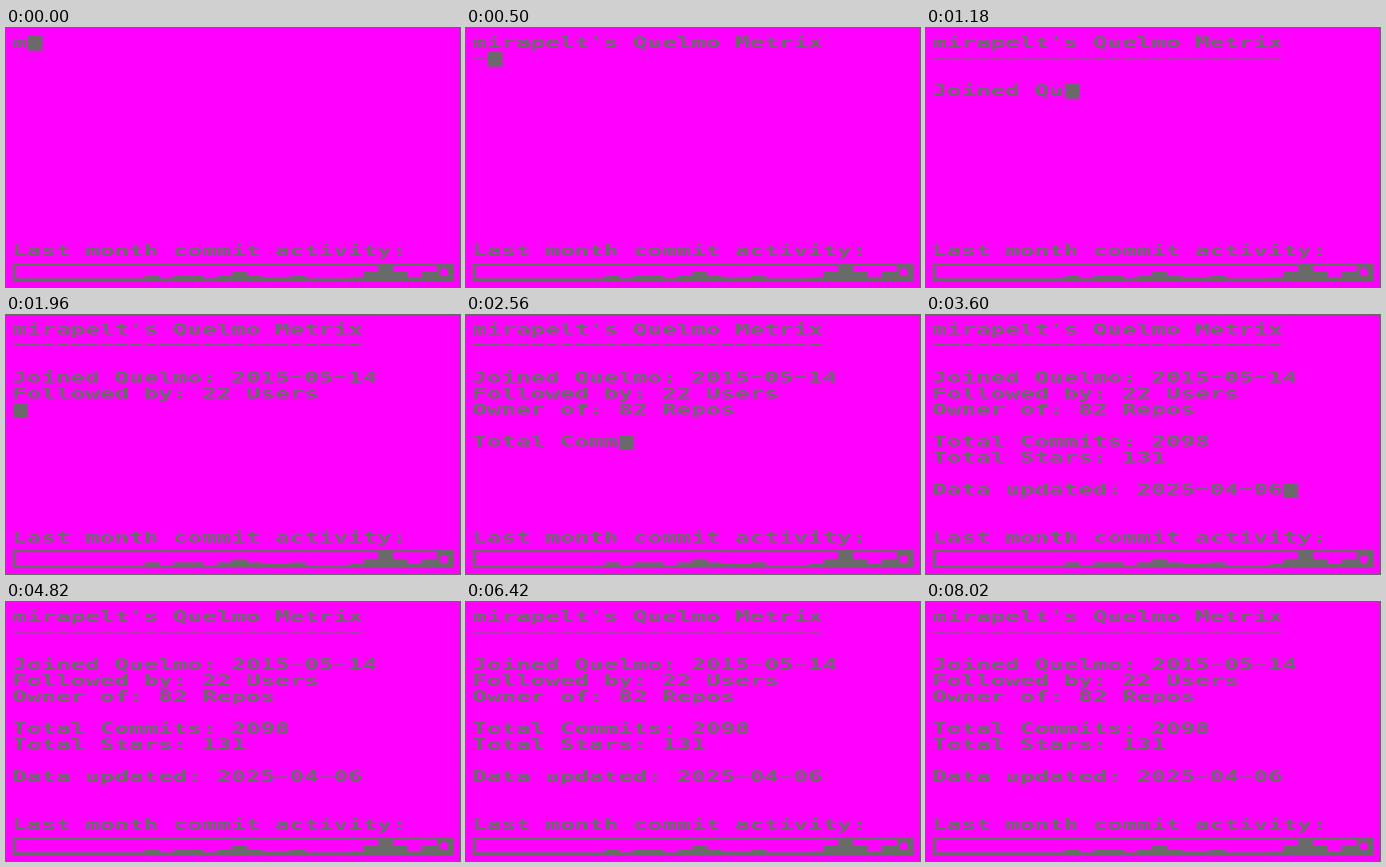
An HTML page with a canvas that plays this animation: 622x356 px, repeating every 8420 ms.

```html
<!DOCTYPE html>
<html lang="en">
<head>
<meta charset="utf-8">
<title>Terminal stats</title>
<style>
  html, body { margin: 0; width: 100%; height: 100%; overflow: hidden; background: #f0f; }
  canvas { display: block; }
</style>
</head>
<body>
<canvas id="stage" width="622" height="356"></canvas>
<script>
const ctx = document.getElementById('stage').getContext('2d');
const INK = '#696969', PAPER = '#ff00ff';
const LEFT = 10, TOP = 11, CELL = 20, LINE = 22;
const KEY_MS = 20, BLINK_START = 4020, BLINK_MS = 400, LOOP_MS = 8420;

const title = "mirapelt's Quelmo Metrix";
const script = [
  title,
  '-'.repeat(title.length),
  '',
  'Joined Quelmo: 2015-05-14',
  'Followed by: 22 Users',
  'Owner of: 82 Repos',
  '',
  'Total Commits: 2098',
  'Total Stars: 131',
  '',
  'Data updated: 2025-04-06'
].join('\n');

// Bar heights per day, measured up from the chart's base line
const bars = [0, 0, 0, 0, 0, 0, 0, 0, 0, 4, 0, 4, 4, 0, 4, 9, 4, 2, 2, 4,
  0, 0, 0, 2, 9, 20, 9, 2, 9, 20];

ctx.font = 'bold 22px "DejaVu Sans Mono", monospace';
const wide = CELL / ctx.measureText('0').width;

function drawLine(text, row) {
  const y = TOP + row * LINE;
  ctx.save();
  ctx.translate(LEFT - 1.5, y + 16);
  ctx.scale(wide, 1); // double-width terminal cells
  ctx.fillText(text.replace(/-/g, ' '), 0, 0);
  ctx.restore();
  [...text].forEach((ch, i) => {
    if (ch === '-') ctx.fillRect(LEFT + i * CELL, y + 7, 16, 2);
  });
}

function drawChart() {
  const top = 323, base = 344, bottom = 348;
  ctx.fillRect(9, top, 605, 3);
  ctx.fillRect(9, base, 605, bottom - base);
  ctx.fillRect(9, top, 5, bottom - top);
  ctx.fillRect(610, top, 4, bottom - top);
  bars.forEach((h, i) => ctx.fillRect(LEFT + i * CELL, base - h, CELL, h));
  ctx.fillStyle = PAPER;
  ctx.beginPath();
  ctx.arc(600, 335.5, 5.5, 0, Math.PI * 2);
  ctx.fill();
}

function draw(t) {
  ctx.fillStyle = PAPER;
  ctx.fillRect(0, 0, 622, 356);
  ctx.fillStyle = INK;

  const lines = script.slice(0, Math.floor(t / KEY_MS) + 1).split('\n');
  lines.forEach(drawLine);

  const row = lines.length - 1;
  const cursorOn = t < BLINK_START || Math.floor((t - BLINK_START) / BLINK_MS) % 2 === 1;
  if (cursorOn) {
    ctx.fillRect(LEFT + lines[row].length * CELL, TOP + row * LINE, 20, 20);
  }

  drawLine('Last month commit activity:', 13);
  drawChart();
}

const start = performance.now();
function tick() {
  draw((performance.now() - start) % LOOP_MS);
  requestAnimationFrame(tick);
}
tick();
</script>
</body>
</html>
```
